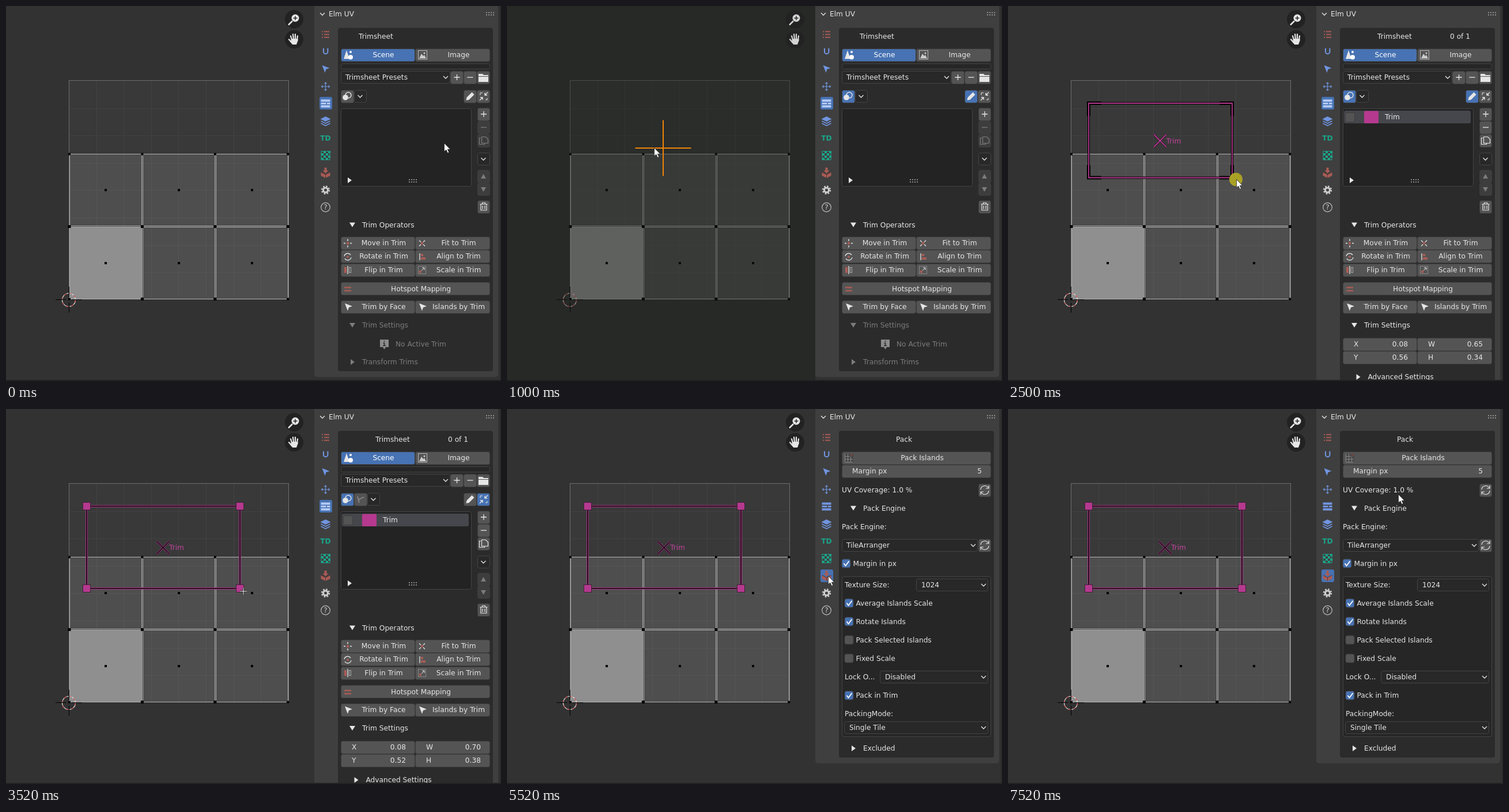
An HTML page for the animation above (8000 ms loop, 859 by 652 pixels).

```html
<!DOCTYPE html>
<html lang="en">
<head>
<meta charset="utf-8">
<title>Trim editor</title>
<style>
html, body { margin: 0; width: 100%; height: 100%; overflow: hidden; background: #323232; }
svg { display: block; font: 12.2px "DejaVu Sans", sans-serif; }
text { white-space: pre; }
</style>
</head>
<body>
<svg id="stage" width="859" height="652" viewBox="0 0 859 652"></svg>
<script>
const LIGHT = '#e6e6e6', GREY = '#545454', BLUE = '#4772b3', DIM = '#7c7c7c', EDGE = '#3d3d3d';
const PINK = '#b5398f', RED = '#a85c55', SKY = '#7094e0', TEAL = '#1aa58a';

// Start time and pointer tip of every step.
const steps = [
  [0, 760, 238], [500, 805, 156], [1000, 255, 246], [1500, 150, 214],
  [2000, 139, 169], [2500, 396, 301], [3020, 812, 170], [3520, 412, 317],
  [4020, 408, 313], [4520, 474, 323], [5020, 557, 290], [6520, 679, 167],
  [7020, 445, 317], [7520, 677, 148]
];
const changes = [...steps.map(s => s[0]), 5520];

const rect = (x, y, w, h, fill, r = 0, stroke = 'none', extra = '') =>
  `<rect x="${x}" y="${y}" width="${w}" height="${h}" fill="${fill}" rx="${r}" stroke="${stroke}" ${extra}/>`;
const line = (d, color = LIGHT, width = 1, extra = '') =>
  `<path d="${d}" fill="none" stroke="${color}" stroke-width="${width}" ${extra}/>`;
const shape = (d, fill = LIGHT, extra = '') => `<path d="${d}" fill="${fill}" ${extra}/>`;
const circle = (x, y, r, fill, stroke = 'none', extra = '') =>
  `<circle cx="${x}" cy="${y}" r="${r}" fill="${fill}" stroke="${stroke}" ${extra}/>`;
const text = (x, y, s, fill = LIGHT, anchor = 'start', extra = '') =>
  `<text x="${x}" y="${Math.round(y + 4.4)}" fill="${fill}" text-anchor="${anchor}" ${extra}>${s}</text>`;
const at = (x, y, content) => `<g transform="translate(${x} ${y})">${content}</g>`;

const button = (x, y, w, fill = GREY, edge = EDGE, h = 22) =>
  rect(x + .5, y + .5, w - 1, h, fill, 3, edge);
const field = (x, y, w, h = 22, fill = '#282828') => button(x, y, w, fill, '#444', h - 1);
const chevron = (x, y) => line(`M${x - 4} ${y - 2}l4 4 4-4`, LIGHT, 1.3);
const dropdown = (x, y, w, label, pad = 9) =>
  field(x, y, w) + text(x + pad, y + 11, label) + chevron(x + w - 8, y + 11);
const triangle = (x, y, open, fill = LIGHT) =>
  shape(open ? `M${x - 5} ${y - 4}h10l-5 8z` : `M${x - 3} ${y - 5}v10l7-5z`, fill);
const section = (x, y, label, open, color) => triangle(x, y, open, color) + text(x + 17, y, label, color);
const dots = (x, y) => line(`M${x} ${y}h14M${x} ${y + 4}h14`, '#aaa', 1.6, 'stroke-dasharray="2 2"');
const plus = (x, y) => line(`M${x - 5} ${y}h10M${x} ${y - 5}v10`, LIGHT, 1.3);
const minus = (x, y, color) => line(`M${x - 5} ${y}h10`, color, 1.3);
const check = (x, y, label, on) => rect(x + .5, y - 7.5, 15, 15, on ? BLUE : GREY, 3, EDGE) +
  (on ? line(`M${x + 4} ${y}l3 4 6-8`, '#fff', 1.8) : '') + text(x + 20, y, label);
const refresh = y => button(818, y, 22) +
  at(829, y + 11, line('M-7-1A7 7 0 0 1 6-4M7-8v5h-5M7 1A7 7 0 0 1-6 4M-7 8v-5h5', LIGHT, 1.2));
const pointer = (x, y) =>
  at(x, y, shape('M.5.5V15l3.3-3 2.6 5.5 2.4-1-2.5-5.3h4.6z', '#fff', 'stroke="#222" stroke-width=".8"'));
const arrowIcon = (x, y, fill) => at(x, y, shape('M-6-6L7-1 1 1-1 7z', fill));
const fourWay = (x, y, color) => at(x, y,
  line('M-7 0H7M0-7V7M-5-2l-2 2 2 2M5-2l2 2-2 2M-2-5l2-2 2 2M-2 5l2 2 2-2', color, 1.2));

function viewport(s) {
  let out = rect(109, 130, 381, 380, '#393939');
  for (let i = 1; i < 8; i++) {
    const k = Math.round(i * 47.6);
    out += line(`M${109.5 + k} 130v380M109 ${130.5 + k}h381`, '#424242');
  }
  out += rect(109.5, 129.5, 381, 380, 'none', 0, '#6e6e6e');
  let marks = '';
  for (let i = 0; i < 6; i++) {
    const col = i % 3, row = i / 3 | 0, selected = i == 3;
    out += rect(110.5 + col * 127, 257.5 + row * 127, 125, 125, selected ? '#8f8f8f' : '#aaa', 0, '#b4b4b4',
      selected ? '' : 'fill-opacity=".18"');
    marks += rect(171 + col * 127, 318 + row * 127, 4, 4, '#000');
  }
  for (let i = 0; i < 12; i++) {
    const col = i % 4, row = i / 4 | 0, size = col % 3 && row || row == 1 ? 5 : 4;
    marks += rect(110 + col * 126.4 - size / 2, 257.5 + row * 126 - size / 2, size, size, '#000');
  }
  out += marks + at(109, 511,
    circle(0, 0, 11.5, 'none', '#eee', 'stroke-width="1.2"') +
    circle(0, 0, 11.5, 'none', '#c84848', 'stroke-width="1.2" stroke-dasharray="4.5 4.5"') +
    line('M-23-.5h18M5-.5h18M.5-23v18M.5 5v17', '#000'));
  if (s.dim) out += rect(0, 0, 535, 650, '#181d17', 0, 'none', 'opacity=".4"');
  return out + viewIcons(s.dim ? .9 : 1);
}

const viewIcons = opacity => `<g opacity="${opacity}">` +
  circle(500, 23, 16, '#222') + circle(500, 58, 16, '#222') +
  circle(502, 21, 6.5, LIGHT) + line('M497 26l-7 7', LIGHT, 2.5) + line('M498.5 21h7M502 17.5v7', '#222', 1.5) +
  at(500, 58, shape('M-5-1H6L7 1 4 9H-3L-6 4z') +
    line('M-4 1L-6-6M-1 0L-2-9M2 0V-9M5 1L6-6M-4 6L-9 0', LIGHT, 2.2, 'stroke-linecap="round"')) + '</g>';

function trim(s) {
  const [r, b] = s.grown ? [406, 312] : [389, 298.5], l = 140, t = 169;
  const frame = `M${l} ${t}H${r}V${b}H${l}z`, cx = (l + r) / 2 - .5, cy = (t + b) / 2 + .5;
  const corners = [[l, t, 1, 1], [r, t, -1, 1], [l, b, 1, -1], [r, b, -1, -1]];
  const cross = 'M-11-11L11 11M11-11L-11 11';
  let out;
  if (s.handles) {
    out = line(frame, PINK, 3.6) + line(frame, '#000', 1.6);
    for (const [x, y] of corners) out += rect(x - 6.5, y - 6.5, 13, 13, PINK, 0, '#43203a');
    out += at(cx, cy, line(cross, PINK, 2.6) + line(cross, '#000', 1.3));
  } else {
    out = line(frame, '#000', 4);
    for (const [x, y, dx, dy] of corners) out += line(`M${x + dx * 22} ${y}H${x}V${y + dy * 22}`, '#000', 6);
    out += line(frame, PINK, 1.8) + at(cx, cy, line(cross, '#000', 3) + line(cross, PINK, 2));
  }
  return out + text(cx + 10.5, cy, 'Trim', '#c2449c');
}

function tabs(s) {
  const x = 554.5, bar = s.pack ? SKY : '#b4caf5';
  let checker = '';
  for (let i = 0; i < 16; i++)
    if ((i + (i >> 2)) % 2) checker += rect(547 + i % 4 * 4, 252 + (i >> 2) * 4, 4, 4, TEAL);
  return rect(544, s.pack ? 279 : 158, 22, 22, BLUE, 3) +
    line('M548 44.5h2M548 49.5h2M548 54.5h2M552 44.5h9M552 49.5h9M552 54.5h9', RED, 2.2) +
    line('M551 73.5v6a3.7 3.7 0 0 0 7.4 0v-6', SKY, 2.1) +
    arrowIcon(x, 109, SKY) + fourWay(x, 140, SKY) +
    at(x, 169.5, rect(-8, -7, 16, 4, bar) + rect(-8, -1.5, 9, 3, bar) + rect(2.5, -1.5, 5.5, 3, bar) + rect(-8, 3, 16, 4, bar)) +
    at(x, 200, shape('M0-8L9-3.5 0 1-9-3.5z', SKY) + line('M-8 0L0 4 8 0M-8 4L0 8 8 4', SKY, 1.6)) +
    text(x, 230, 'TD', TEAL, 'middle', 'font-weight="bold"') +
    checker + rect(547, 252.5, 15, 15, 'none', 0, TEAL) +
    at(x, 290, shape('M-8-1L0 3 8-1V5L0 9-8 5zM-2-9H2V-4H5L0 1-5-4H-2z', RED) + line('M-8-1L0 3 8-1M0 3V9', '#5a3335')) +
    at(x, 320, circle(0, 0, 4, 'none', '#cfcfcf', 'stroke-width="3"') +
      circle(0, 0, 6.5, 'none', '#cfcfcf', 'stroke-width="2.4" stroke-dasharray="2.55"')) +
    circle(x, 350, 7.8, 'none', '#bbb', 'stroke-width="1.2"') +
    text(x, 350, '?', '#ccc', 'middle');
}

function operators() {
  const rows = [['Move in Trim', 'Fit to Trim'], ['Rotate in Trim', 'Align to Trim'], ['Flip in Trim', 'Scale in Trim']];
  const pair = (y, a, b) => button(581, y, 129) + button(710, y, 130) +
    text(655.5, y + 10.5, a, LIGHT, 'middle') + text(785.5, y + 10.5, b, LIGHT, 'middle');
  return rows.map(([a, b], i) => pair(401 + Math.round(i * 23.3), a, b)).join('') +
    at(593, 412.5, rect(-2, -2, 4, 4, RED) + line('M-7 0h3M4 0h3M0-7v3M0 4v3', LIGHT, 1.6)) +
    at(722, 412.5, rect(-2, -2, 4, 4, RED) + line('M-5-5l3 3M5-5l-3 3M-5 5l3-3M5 5l-3-3', LIGHT, 1.2)) +
    at(593, 436, circle(0, 0, 2, RED) + line('M-6-1A6 6 0 0 1 5-3M6 1A6 6 0 0 1-5 3', LIGHT, 1.3)) +
    at(722, 436, line('M-4-6V6', LIGHT, 1.3) + rect(-2, -5, 4, 4, RED) + rect(-2, 1, 8, 4, RED)) +
    at(593, 459, rect(-6, -5, 4, 10, RED) + line('M0-7V7', LIGHT, 1.3) + rect(2.5, -4.5, 3, 9, 'none', 0, '#aaa')) +
    at(722, 459, rect(-6.5, -6.5, 13, 13, 'none', 0, '#888') + rect(-5, 1, 4, 4, RED) + line('M-1 1L4-4M0-4h4v4')) +
    button(581, 480, 259) + text(720, 491.5, 'Hotspot Mapping', LIGHT, 'middle') +
    line('M587 489.5h12M587 495h12', RED, 2.5) +
    pair(512, 'Trim by Face', 'Islands by Trim') + arrowIcon(594, 523, LIGHT) + arrowIcon(723, 523, LIGHT);
}

function settings(s) {
  const head = section(601, 555, 'Trim Settings', true, s.trim ? LIGHT : DIM);
  if (!s.trim) return head +
    shape('M649 580h15v13h-5l-2.5 4-2.5-4h-5z', '#8c8c8c') +
    line('M656.5 582v2M654.5 586h2v4.5M654 590.5h5', '#2b2b2b', 1.6) +
    text(676, 587.5, 'No Active Trim', DIM) + section(601, 619, 'Transform Trims', false, DIM);
  const cell = (x, y, w, name, value) => button(x, y, w) + text(x + 19, y + 11, name) +
    text(x + w - 16, y + 11, value, LIGHT, 'end');
  const [w, y, h] = s.grown ? ['0.70', '0.52', '0.38'] : ['0.65', '0.56', '0.34'];
  return head + cell(581, 577, 129, 'X', '0.08') + cell(710, 577, 130, 'W', w) +
    cell(581, 600, 129, 'Y', y) + cell(710, 600, 130, 'H', h) +
    section(607.5, 645, 'Advanced Settings', false);
}

function trimPanel(s) {
  const faded = s.trim ? LIGHT : DIM, side = s.trim ? GREY : EDGE, menu = s.handles ? 627 : 604;
  return (s.trim ? text(641, 52.5, 'Trimsheet') + text(767, 52.5, '0 of 1') : text(612, 52.5, 'Trimsheet')) +
    button(581, 74, 129, BLUE) + button(710, 74, 130) +
    text(655, 85, 'Scene', '#fff', 'middle') + text(785.5, 85, 'Image', LIGHT, 'middle') +
    at(594, 85, shape('M-3-8L2 7H-8z') + circle(4, 4, 4, '#fff') + circle(4, -5, 2, '#fff')) +
    at(723, 85, rect(-7.5, -7.5, 15, 15, 'none', 0, '#bbb') + shape('M-6 6L-2-2 1 2 3 0 6 6z', '#ccc') +
      circle(3, -3, 1.5, '#ccc')) +
    field(581, 100, 259, 10, '#262626') + dropdown(581, 113, 190, 'Trimsheet Presets', 8) +
    button(771, 113, 23) + plus(782.5, 124) + button(794, 113, 23) + minus(805.5, 124, LIGHT) +
    button(817, 113, 23) + shape('M820 118h7l2 2h8v2h-17zM820 123h17v9h-17z') +
    button(581, 146, 23, s.overlay ? BLUE : GREY) +
    circle(589, 159, 4.8, LIGHT) + circle(594, 155, 5, 'none', LIGHT, 'stroke-width="1.4"') +
    (s.handles ? button(604, 146, 23) + line('M610 152l3 11M611 158l10-5', '#999', 1.2) : '') +
    field(menu, 146, 22) + chevron(menu + 10.5, 157) +
    button(794, 146, 23, s.edit ? BLUE : s.hover ? '#686868' : GREY) +
    at(805.5, 157, shape('M-7 7L-6 2 3-7 7-3-2 6z')) +
    button(817, 146, 23, s.handles ? BLUE : GREY) +
    at(829, 157, line('M7-7L2-2M2-6v4h4M-7 7L-2 2M-6 2h4v4', LIGHT, 1.4) + line('M-6-6h4M-6-6v4M6 6h-3M6 6v-3')) +
    field(581, 178, 227, 136, '#232323') + triangle(596, 303, false) + dots(699, 302) +
    (s.trim ? rect(583, 182, 220, 22, '#46474c', 3) + rect(585.5, 185.5, 16, 16, GREY, 3, EDGE) +
      rect(618, 182.5, 25, 21.5, PINK, 2) + text(654, 193, 'Trim') : '') +
    button(818, 177, 22) + plus(829, 188) + button(818, 200, 22, side) + minus(829, 211, faded) +
    button(818, 223, 22, side) + line('M824 229.5h-2.5v11h9v-2M825.5 227.5h7l4 4v7h-11z', faded, 1.2) +
    field(818, 255, 22) + chevron(828.5, 266) +
    button(818, 285, 22, EDGE) + button(818, 307, 22, EDGE) +
    shape('M824 300h9l-4.5-8z', DIM) + shape('M824 315h9l-4.5 8z', DIM) +
    button(818, 338, 22) +
    line('M822.5 344.5h13M826.5 344v-2h5v2M824 345v10h10v-10M827 347v6M831 347v6', LIGHT, 1.2) +
    section(601, 380.5, 'Trim Operators', true) + operators() + settings(s);
}

function packPanel() {
  return text(675, 52.5, 'Pack') +
    button(581, 74, 259) + button(581, 97, 259) +
    text(720.5, 85, 'Pack Islands', LIGHT, 'middle') +
    at(593, 85, rect(-7, -7, 15, 15, '#484848') +
      line('M-7 7.5H7M-7 2.5H7M-7-2.5H2M-6.5-7V7M-1.5-7V7M3.5-2V7', '#858585') + rect(3, -7, 4, 4, '#6b4744')) +
    text(599, 108, 'Margin px') + text(824, 108, '5', LIGHT, 'end') +
    text(581, 140.5, 'UV Coverage: 1.0 %') + refresh(130) +
    section(601, 172.5, 'Pack Engine', true) + text(581, 204.5, 'Pack Engine:') +
    dropdown(581, 226, 236, 'TileArranger', 8) + refresh(226) +
    check(580.5, 268.5, 'Margin in px', true) + field(581, 291, 259, 279, '#262626') +
    text(586, 305.5, 'Texture Size:') + dropdown(710, 295, 125, '1024') +
    check(585.5, 337.5, 'Average Islands Scale', true) + check(585.5, 369.5, 'Rotate Islands', true) +
    check(585.5, 401.5, 'Pack Selected Islands') + check(585.5, 433.5, 'Fixed Scale') +
    text(586, 466, 'Lock O...') + dropdown(647, 455, 188, 'Disabled') +
    check(585.5, 498, 'Pack in Trim', true) + text(586, 530, 'PackingMode:') +
    dropdown(585, 543, 250, 'Single Tile') + section(601, 590, 'Excluded', false);
}

function scene(t) {
  const [time, x, y] = steps.findLast(s => s[0] <= t);
  const s = {
    hover: time == 500, dim: t >= 1000 && t < 2500, overlay: t >= 1000, edit: t >= 1000 && t < 3520,
    trim: t >= 2500, grown: t >= 3020, handles: t >= 3520, pack: t >= 5520
  };
  const bottom = s.pack ? 616 : s.trim ? 670 : 645;
  let out = rect(0, 0, 859, 652, '#323232') + viewport(s);
  if (s.trim) out += trim(s);
  if (s.dim) {
    const [cx, cy] = time == 1000 ? [271, 247] : [x, y];
    out += line(`M${cx - 48.5} ${cy}h97M${cx} ${cy - 48.5}v97`, '#f08307', 2);
  }
  if (time == 1500 || time == 2000)
    out += rect(120.5, 220, 206, 35.5, '#1b1b1b', 4) + text(134, 237, 'Create trims modal operator', '#dcdcdc');
  out += rect(535, -5, 319, bottom + 5, '#3f3f3f', 5) + rect(576, 38, 269, bottom - 48, '#2b2b2b', 4) +
    chevron(549, 14) + text(560, 14, 'Elm UV') + dots(833, 11.5) +
    tabs(s) + (s.pack ? packPanel() : trimPanel(s)) +
    rect(0, 650, 859, 2, '#232323') + rect(857.5, 0, 1.5, 652, '#292929');
  if (time == 2500) out += circle(395.5, 301.5, 11.5, '#a9a125');
  const crosshair = 'M406 317h12M412 311v12';
  return out + (time == 3520 ? line(crosshair, '#222', 3) + line(crosshair, '#fff', 1) : pointer(x, y));
}

const stage = document.getElementById('stage');
let shown = -1;
function draw() {
  const t = performance.now() % 8000;
  const start = Math.max(...changes.filter(c => c <= t));
  if (start !== shown) stage.innerHTML = scene(shown = start);
  requestAnimationFrame(draw);
}
draw();
</script>
</body>
</html>
```
